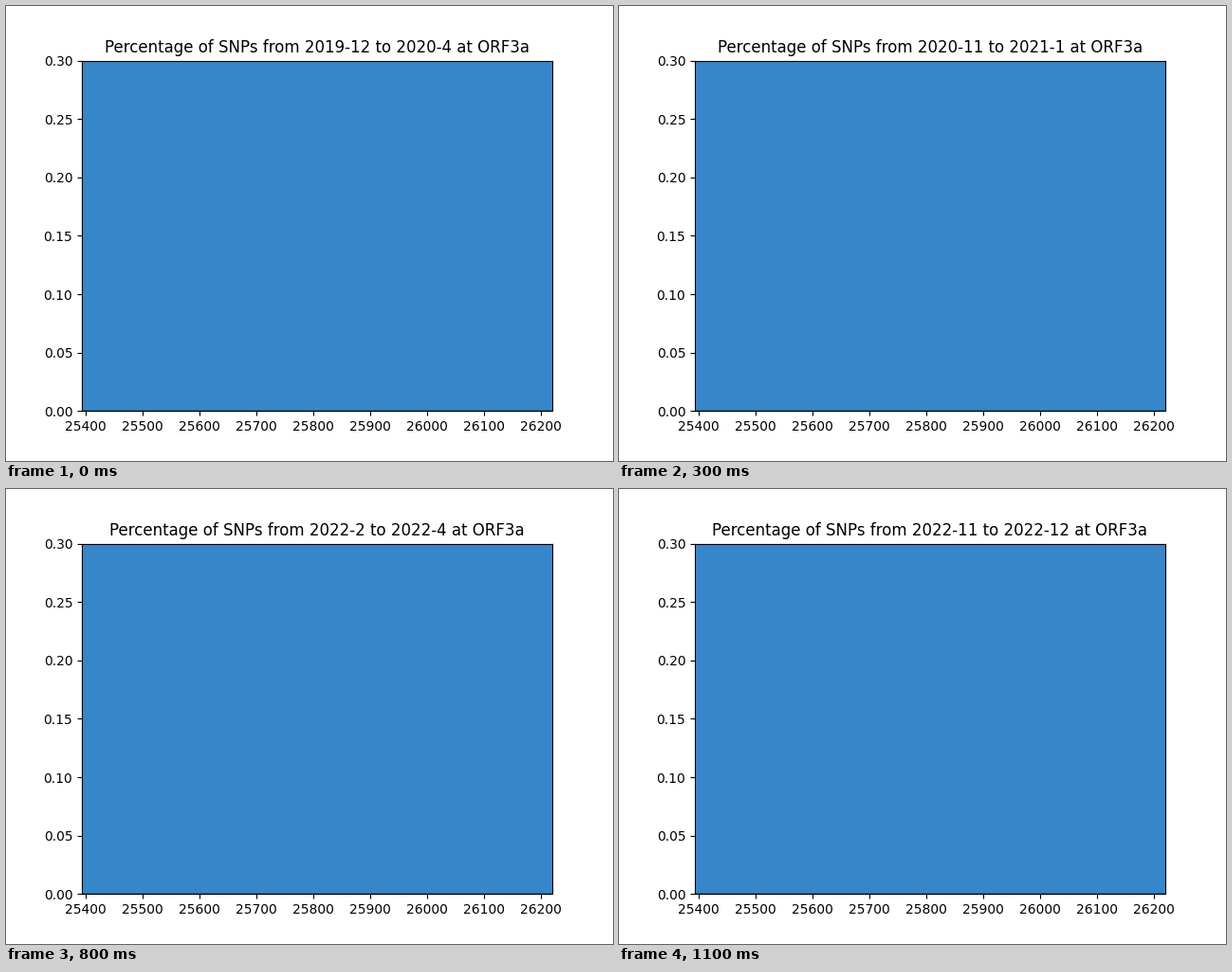
Recreate the animation shown at these times as a matplotlib script. Size 640 by 480 pixels, loop 1.2 s.

```python
import matplotlib.pyplot as plt
from matplotlib.animation import FuncAnimation

GENE_START, GENE_END = 25393, 26220
BAR_LEFT = 25300
FULL_RIGHT, SHORT_RIGHT = 26300, 25600
SHORT_STEP = 2
STEPS = 12


def month_name(n):
    """Year-month label, counting months from January 2020."""
    return f"{2020 + n // 12}-{n % 12 + 1}"


def period(i):
    """First and last month of a quarter, cut to the surveyed range."""
    first = -1 if i == 0 else 3 * i + 1
    last = min(3 * i + 3, 35)
    return month_name(first), month_name(last)


fig, ax = plt.subplots(figsize=(6.4, 4.8), dpi=100)
ax.set_xlim(GENE_START, GENE_END)
ax.set_ylim(0, 0.3)
bar = ax.bar(BAR_LEFT, 1, width=FULL_RIGHT - BAR_LEFT, align="edge",
             color="#3786c9", edgecolor="black", linewidth=1)[0]
ax.set_xlim(GENE_START, GENE_END)
ax.set_ylim(0, 0.3)
title = ax.set_title("")


def update(i):
    start, end = period(i)
    title.set_text(f"Percentage of SNPs from {start} to {end} at ORF3a")
    right = SHORT_RIGHT if i == SHORT_STEP else FULL_RIGHT
    bar.set_width(right - BAR_LEFT)
    return bar, title


anim = FuncAnimation(fig, update, frames=STEPS, interval=100,
                     repeat=True, repeat_delay=0)
plt.show()
```
